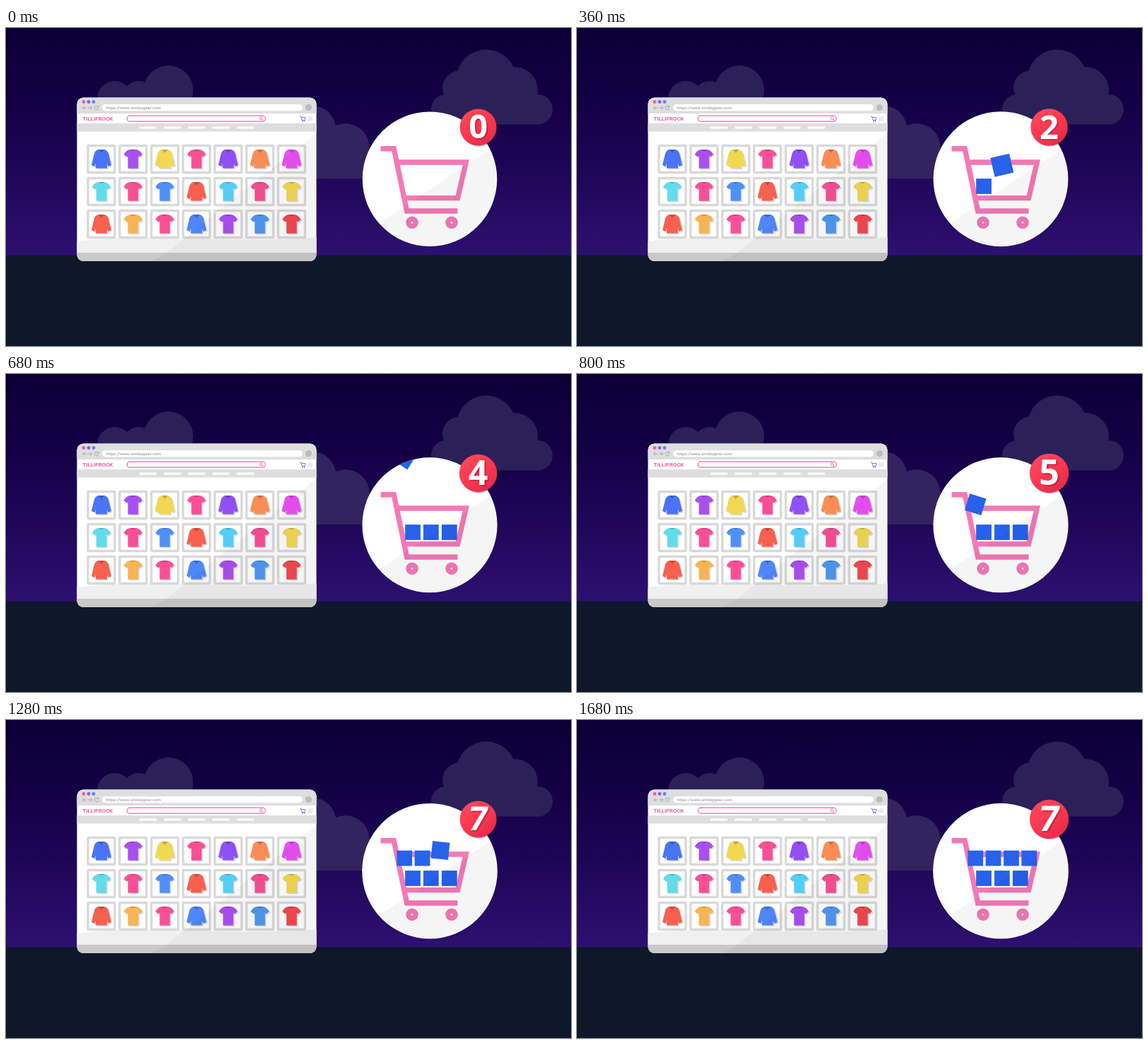
Recreate the animation shown at these times as an HTML page. Size 800 by 450 pixels, loop 1.72 s.

```html
<!DOCTYPE html>
<html lang="en">
<head>
<meta charset="utf-8">
<title>Shop and cart</title>
<style>
  html, body { margin: 0; width: 100%; height: 100%; overflow: hidden; background: #0f172a; }
  svg { display: block; width: 800px; height: 450px; }
  .url { font: 500 6.1px Roboto, sans-serif; fill: #a2a2a6; }
  .brand { font: 700 7.9px Roboto, sans-serif; fill: #ee5fab; }
  .digit { font: 700 47px "Open Sans", sans-serif; text-anchor: middle; }
</style>
</head>
<body>
<svg viewBox="0 0 800 450">
  <defs>
    <linearGradient id="sky" x2="0" y2="1">
      <stop offset="0" stop-color="#0b0036"/>
      <stop offset=".32" stop-color="#140045"/>
      <stop offset=".6" stop-color="#1d0556"/>
      <stop offset="1" stop-color="#2d1070"/>
    </linearGradient>
    <linearGradient id="red" x2=".8" y2="1">
      <stop offset="0" stop-color="#ff4c5c"/>
      <stop offset=".55" stop-color="#fa3850"/>
      <stop offset="1" stop-color="#e42a48"/>
    </linearGradient>
    <clipPath id="win"><rect x="100.5" y="98.5" width="339" height="231.5" rx="9"/></clipPath>
    <clipPath id="disc"><circle cx="600" cy="213.7" r="95.4"/></clipPath>
    <path id="long" d="M-4.5-13.5H4.5Q8.5-12.5 10-8L14 8.5L9.5 10.5L8 6V13H-8V6L-9.5 10.5L-14 8.5L-10-8Q-8.5-12.5-4.5-13.5Z"/>
    <path id="tee" d="M-4.5-13.5H4.5Q10-12.5 13.2-6.5L9-3L7.3-4.5V13.2H-7.3V-4.5L-9-3L-13.2-6.5Q-10-12.5-4.5-13.5Z"/>
  </defs>

  <rect width="800" height="322" fill="url(#sky)"/>
  <rect y="321.5" width="800" height="128.5" fill="#0f172a"/>

  <g fill="#2b2158">
    <circle cx="230" cy="88" r="35"/><circle cx="188" cy="98" r="23"/><circle cx="154" cy="100" r="25"/>
    <circle cx="680" cy="73" r="42.5"/><circle cx="720" cy="88" r="33"/><circle cx="643" cy="85" r="25"/>
    <rect x="602" y="94" width="172" height="42.5" rx="21.2"/>
    <path fill="#32245f" d="M400 213V150A33.5 33.5 0 0 1 467 138A34 34 0 0 1 514.5 170V213Z"/>
  </g>

  <g clip-path="url(#win)">
    <path fill="#fff" d="M100 98H440V330H100Z"/>
    <path fill="#dedede" d="M100 98H440V121H100ZM100 135H440V146.5H100Z"/>
    <path fill="#f0f0f0" d="M100 302Q160 294 270 298T440 296V318H100Z"/>
    <path fill="#c9c9c9" d="M100 318H440V330H100Z"/>
    <circle cx="110" cy="104.5" r="2.4" fill="#f4599f"/>
    <circle cx="117" cy="104.5" r="2.4" fill="#8a5cf0"/>
    <circle cx="124" cy="104.5" r="2.4" fill="#5a84f5"/>
    <path fill="none" stroke="#a8a8a8" d="M114 113H108.5M111 110.8L108.5 113L111 115.2M116.3 113H121.8M119.3 110.8L121.8 113L119.3 115.2M130.3 111.3A2.7 2.7 0 1 0 130.6 114M131 109.8V112H128.6"/>
    <rect x="136" y="108" width="284" height="9.2" rx="4.6" fill="#fff"/>
    <text class="url" x="141.5" y="114.8">https://www.smileygear.com</text>
    <circle cx="428.3" cy="112.6" r="4.6" fill="#bcbcbe"/>
    <text class="brand" x="108.3" y="131.4">TILLIFROCK</text>
    <g fill="none" stroke="#ee69ae">
      <rect x="171.3" y="124.2" width="196" height="8" rx="4" stroke-width="1.2"/>
      <circle cx="361" cy="127.7" r="1.9" stroke-width=".9"/><path d="M362.5 129.2L364.2 131"/>
    </g>
    <path fill="none" stroke="#8077ee" d="M416 125H417.7L419.2 130.5H423L424 126.5H418.2"/>
    <path fill="#8077ee" d="M419 131H420.6V132.4H419ZM421.8 131H423.4V132.4H421.8Z"/>
    <path stroke="#dcdcdc" stroke-width="1.2" d="M427.3 126H434M427.3 128.2H434M427.3 130.4H434"/>
    <path stroke="#fff" stroke-width="3" stroke-linecap="round" d="M190 141H212M224.5 141H246.5M259 141H281M293.5 141H315.5M328 141H350"/>
    <g id="shelf"></g>
    <path fill="#000" opacity=".04" d="M440 148L226 319L206 330H440Z"/>
  </g>

  <circle id="plate" cx="600" cy="213.7" r="95.3" fill="#fff"/>
  <g clip-path="url(#disc)">
    <g fill="none" stroke="#f479b6" stroke-width="7.4">
      <path d="M530.5 170.8H549.2L567.6 259H639.5M554 190H651.3L639.6 240.6H564"/>
      <circle cx="575" cy="275.3" r="5.1"/><circle cx="631" cy="275.3" r="5.1"/>
    </g>
    <g id="cubes" fill="#2862ea"></g>
    <path fill="#000" opacity=".04" d="M700 162L520 282V320H700Z"/>
  </g>

  <g id="badge">
    <circle r="26" cx="1" cy="1.2" fill="#20063c" opacity=".25"/>
    <circle r="26" fill="url(#red)"/>
    <g id="count" class="digit">
      <text x="2" y="17.6" fill="#c01f3c" opacity=".75"></text>
      <text y="16" fill="#fff"></text>
    </g>
  </g>
</svg>

<script>
const LOOP = 1720, TICK = 40, FALL = 230, DROP = 115, BEAT = 175;
const $ = id => document.getElementById(id);

function add(parent, tag, attrs) {
  const el = document.createElementNS('http://www.w3.org/2000/svg', tag);
  for (const k in attrs) el.setAttribute(k, attrs[k]);
  return parent.appendChild(el);
}

// L = long sleeves, T = tee
const shirts = [
  'L4a74f5 Ta94ff0 Lf2d852 Tfa4f96 L9050f5 Lf98d55 Lea50f5',
  'T62dcea Tfa4f96 T4f90f8 Lf8604f T55cdf5 Tfa4f96 Tf2d852',
  'Lf8604f Tf8b452 Tfa4f96 L4f86f8 Tad50f2 T4f98f2 Tf24a50'
];
shirts.forEach((row, r) => row.split(' ').forEach((item, c) => {
  const x = 135 + c * 44.9, y = 185.5 + r * 46, long = item[0] === 'L';
  const g = add($('shelf'), 'g', { transform: `translate(${x} ${y})` });
  const shape = long ? '#long' : '#tee';
  add(g, 'rect', { x: -19, y: -19, width: 38, height: 38, rx: 1, fill: '#fff', stroke: '#d9d9d9', 'stroke-width': 3.4 });
  add(g, 'use', { href: shape, x: 1.8, y: 1.6, fill: '#dcdce2' });
  add(g, 'use', { href: shape, fill: '#' + item.slice(1) });
  add(g, 'path', { d: long ? 'M-4.2-13.5H4.2L0-8.5Z' : 'M-4-13.5H4Q0-9.5-4-13.5Z', opacity: .22 });
}));

// x, y, start time, starting turn
const cubes = [
  [576, 224, 40, 60], [601.8, 224, 247, -50], [627.8, 224, 393, 140],
  [564.2, 195.6, 641, 178], [589.5, 195.6, 921, -54], [615, 195.6, 1121, 60], [640.2, 195.6, 1321, -42]
].map(([x, y, start, turn]) => ({
  x, y, start, turn,
  el: add($('cubes'), 'rect', { x: -10.9, y: -10.9, width: 21.8, height: 21.8 })
}));

function draw(t) {
  for (const { x, y, start, turn, el } of cubes) {
    const p = Math.min(1, (t - start) / FALL), left = (1 - p) ** 2;
    el.style.display = p < 0 ? 'none' : '';
    const size = 1 + .26 * Math.min(1, left * 5);
    el.setAttribute('transform', `translate(${x} ${y - DROP * left}) rotate(${turn * left}) scale(${size})`);
  }

  const n = Math.min(7, Math.floor(t / BEAT + .5));
  let since = n ? t - (n - .5) * BEAT : 999;
  if (t >= 1660) since = t - 1660;
  const pop = 1 + .075 * Math.max(0, 1 - since / 110);
  $('badge').setAttribute('transform', `translate(668.6 140.4) scale(${pop})`);
  $('count').setAttribute('transform', n === 7 ? 'skewX(-8)' : '');
  for (const label of $('count').children) label.textContent = n;
  $('plate').setAttribute('r', 95.3 + .6 * Math.min(1, t / 1480));
}

const t0 = performance.now();
function loop(now) {
  const t = Math.max(0, now - t0) % LOOP;
  draw(Math.floor(t / TICK) * TICK);
  requestAnimationFrame(loop);
}
draw(0);
requestAnimationFrame(loop);
</script>
</body>
</html>
```
